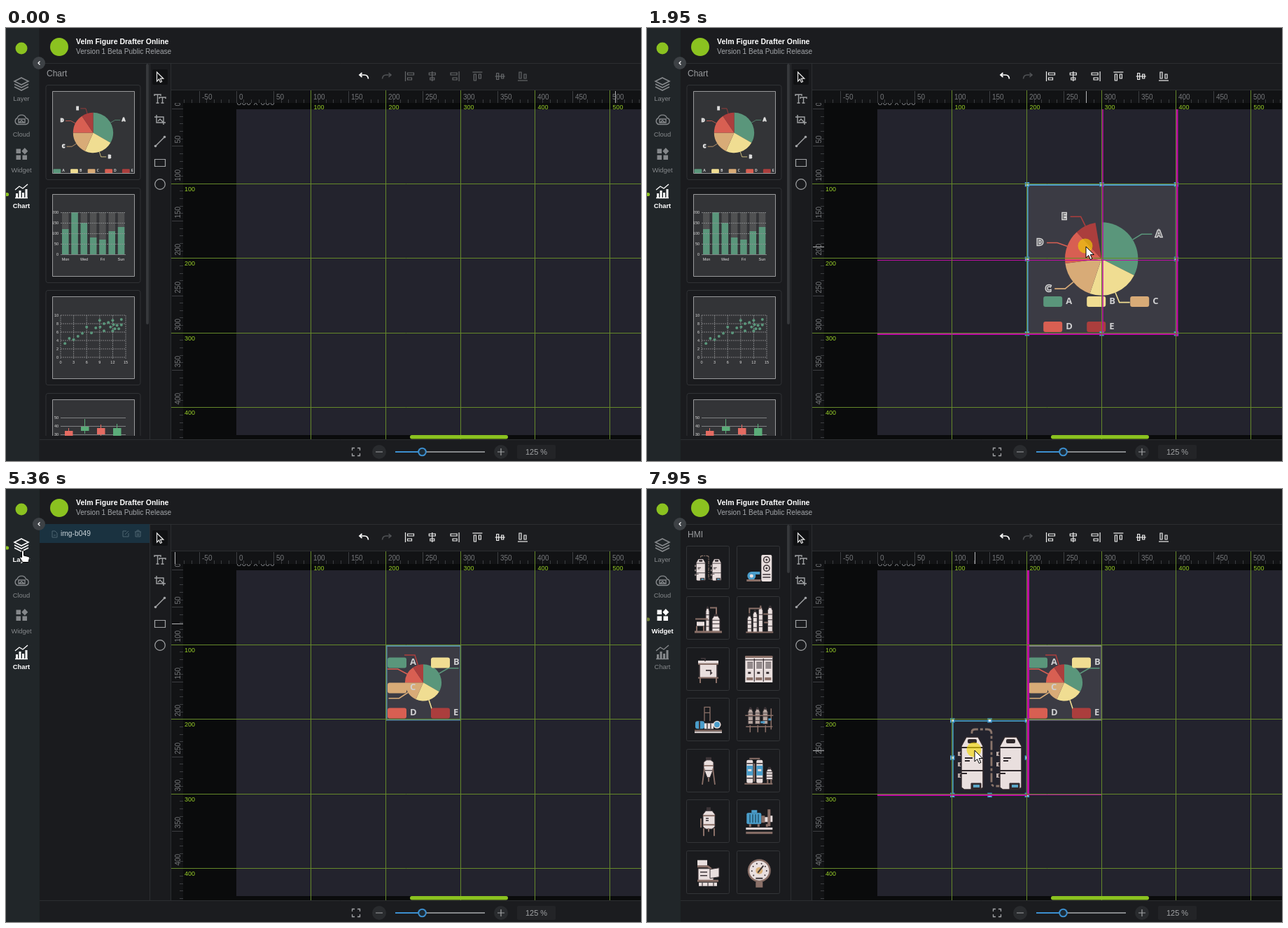
Animation of 907 by 618 pixels, one loop 8000 ms. Source, as an HTML page with a canvas:

```html
<!DOCTYPE html>
<html lang="en">
<head>
<meta charset="utf-8">
<title>Sketch builder</title>
<style>
html, body { margin: 0; width: 100%; height: 100%; overflow: hidden; background: #1a1b1e; }
canvas { display: block; }
</style>
</head>
<body>
<canvas id="stage" width="907" height="618"></canvas>
<script>
const c = document.getElementById('stage').getContext('2d');
const LOOP = 8000, RAD = Math.PI / 180;
const PANEL = '#1a1b1e', LINE = '#2c2e31', GREEN = '#8bc220', PINK = '#bd0ca4', VEIL = 'rgba(255,255,255,.11)';
const LIGHT = '#e9dfde', DARK = '#3d3538', BROWN = '#8a7068', BLUE = '#4a9dca';
const COLORS = ['#46896b', '#eed985', '#d3a066', '#d34b3d', '#a12625'];
const ENDS = [0, 120, 204, 270, 326, 360];

// Cursor path: time, x, y, and 1 for a segment of even speed
const PATH = [
  [70, 84, 168], [220, 113, 139], [900, 611, 314], [1400, 611, 314], [1800, 627, 312], [2080, 627, 312],
  [2580, 765, 449], [2960, 754, 437], [3250, 754, 437], [3310, 702, 386, 1], [3370, 666, 361, 1],
  [3560, 650, 336, 1], [4190, 646, 330], [4430, 646, 330], [5240, 24, 88], [5480, 24, 88], [6100, 22, 180],
  [6200, 22, 180], [6450, 100, 115], [6930, 330, 326, 1], [7300, 480, 390, 1], [7720, 480, 390], [7930, 468, 373]];
const PRESSES = [[200, 950], [1400, 2050], [3200, 4320], [5260, 5330], [6130, 6200], [6450, 7330], [7620, 8000]];

const clamp = (v, lo = 0, hi = 1) => Math.max(lo, Math.min(hi, v));
const smooth = p => (p = clamp(p), p * p * (3 - 2 * p));
const within = (t, a, b) => t >= a && t < b;
const X = u => 329.3 + u * 1.066, Y = u => 115.6 + u * 1.0656;
const snap = v => Math.floor(v) + .5;

function cursorAt(t) {
  const i = PATH.findIndex(k => k[0] > t);
  if (i <= 0) return PATH[i ? PATH.length - 1 : 0].slice(1, 3);
  const [t0, x0, y0] = PATH[i - 1], [t1, x1, y1, even] = PATH[i];
  const p = (t - t0) / (t1 - t0), q = even ? p : smooth(p);
  return [x0 + (x1 - x0) * q, y0 + (y1 - y0) * q];
}

function rect(color, x, y, w, h, r = 0) {
  c.fillStyle = color;
  c.beginPath(); c.roundRect(x, y, w, h, r); c.fill();
}
function frame(color, x, y, w, h, width = 1, r = 0) {
  c.strokeStyle = color; c.lineWidth = width;
  c.beginPath(); c.roundRect(x, y, w, h, r); c.stroke();
}
function disc(color, x, y, r) {
  c.fillStyle = color;
  c.beginPath(); c.arc(x, y, r, 0, 7); c.fill();
}
function path(d, color, width = 1, fill) {
  const p = new Path2D(d);
  if (fill) { c.fillStyle = fill; c.fill(p); }
  if (color) { c.strokeStyle = color; c.lineWidth = width; c.stroke(p); }
}
const line = (x0, y0, x1, y1, color, width) => path(`M${x0} ${y0}L${x1} ${y1}`, color, width);
function text(s, x, y, size, color, align = 'left', weight = '') {
  c.font = `${weight} ${size}px "Liberation Sans", Arial, sans-serif`;
  c.textAlign = align; c.textBaseline = 'middle'; c.fillStyle = color;
  c.fillText(s, x, y);
}
function at(x, y, scale, draw) {
  c.save(); c.translate(x, y); c.scale(scale, scale); draw(); c.restore();
}
function clipped(x, y, w, h, draw) {
  c.save(); c.beginPath(); c.rect(x, y, w, h); c.clip(); draw(); c.restore();
}

function pieChart(x, y, size, progress, small) {
  const cx = x + size / 2, cy = y + size / 2, r = size * .245, k = small ? .5 : 1;
  const wide = size > 170;
  const font = s => `bold ${s}px "Noto Sans", "Open Sans", sans-serif`;
  c.textBaseline = 'middle';
  COLORS.forEach((color, i) => {
    const a = ENDS[i] * progress, b = ENDS[i + 1] * progress, mid = ((a + b) / 2 - 90) * RAD;
    c.fillStyle = color;
    c.beginPath(); c.moveTo(cx, cy); c.arc(cx, cy, r, (a - 90) * RAD, (b - 90) * RAD); c.fill();
    if (progress < .85) return;
    const side = Math.cos(mid) < 0 ? -1 : 1, out = r + 15 * k;
    const ex = cx + Math.cos(mid) * out, ey = cy + Math.sin(mid) * out, end = ex + side * 15 * k;
    path(`M${cx + Math.cos(mid) * r} ${cy + Math.sin(mid) * r}L${ex} ${ey}H${end}`, color, 1.6 * k);
    if (!wide && !small) return;
    const label = i === 3 && within(size, 150, 211) ? '...' : 'ABCDE'[i];
    c.font = font(13 * k); c.textAlign = side < 0 ? 'right' : 'left';
    c.strokeStyle = '#d8d8d8'; c.lineWidth = 2.4 * k; c.fillStyle = small ? '#d8d8d8' : '#66666a';
    c.strokeText(label, end + side * 5 * k, ey); c.fillText(label, end + side * 5 * k, ey);
  });
  COLORS.forEach((color, i) => {
    const col = small ? i : wide ? i % 3 : [0, 1, 0, 0, 1][i];
    const up = small ? 0 : wide ? (i < 3) : [2, 2, 1, 0, 0][i];
    const s = small ? .4 : 1;
    const lx = small ? x + 1.5 + i * 24.6 : cx - (wide ? 83 : 51) + col * 62, ly = y + size - 17 * s - up * 36;
    rect(color, lx, ly, 27 * s, 15 * s, 3 * s);
    c.font = font(13 * s); c.textAlign = 'left'; c.fillStyle = '#c9c9cb';
    c.fillText('ABCDE'[i], lx + 32 * s, ly + 7 * s);
  });
}

const label = (s, x, y, align) => text(s, x, y, 5.5, '#dcdcdc', align);
function gridLine(x0, y0, x1, y1, dash = [2, 1]) {
  c.setLineDash(dash); line(x0, y0, x1, y1, '#85878a', .8); c.setLineDash([]);
}
function barChart() {
  [120, 200, 150, 80, 70, 110, 130].forEach((v, i) => {
    rect('#3a3b3d', 80 + i * 13.3, 263, 9.5, 60);
    rect(COLORS[0], 80 + i * 13.3, 323 - v * .3, 9.5, v * .3);
  });
  for (let v = 0; v <= 200; v += 50) {
    gridLine(78, 323.5 - v * .3, 171, 323.5 - v * .3, v ? [2, 1] : []);
    label(v, 75, 323.5 - v * .3, 'right');
  }
  ['Mon', 'Wed', 'Fri', 'Sun'].forEach((d, i) => label(d, 85 + i * 26.5, 330, 'center'));
}
function scatterChart() {
  for (let i = 0; i < 6; i++) {
    gridLine(78, 470 - i * 12, 171, 470 - i * 12);
    gridLine(78 + i * 18.6, 410, 78 + i * 18.6, 472);
    label(i * 2, 75, 470 - i * 12, 'right');
    label(i * 3, 78 + i * 18.6, 477, 'center');
  }
  [[1, 3.3], [2, 4.5], [3, 4.2], [4, 5], [5, 5.7], [6, 7.2], [7.1, 5.8], [8.1, 7], [9, 8.8], [9.1, 7.2], [10, 8],
   [10, 6.3], [11, 8.3], [11.5, 7.2], [12, 6.3], [12, 8.8], [12.2, 7.8], [12.5, 6.8], [13, 7.6], [13.4, 6.8],
   [14, 9], [14, 7.7]].forEach(([x, y]) => disc(COLORS[0], 78 + x * 6.2, 470 - y * 6, 2));
}
function candleChart() {
  [50, 40, 30].forEach((v, i) => {
    gridLine(78, 556.5 + i * 12, 171, 556.5 + i * 12, []);
    label(v, 75, 556.5 + i * 12, 'right');
  });
  [[575, 9, 571], [569, 6, 558], [571, 9, 566], [571, 12, 565]].forEach(([y, h, wick], i) => {
    const x = 84 + i * 23, color = i % 2 ? '#47a268' : '#e0594f';
    line(x + 5.5, wick, x + 5.5, y + h + 4, color, 1);
    rect(color, x, y, 11.5, h);
  });
}
function thumb(x, y, draw) {
  draw();
  rect(VEIL, x, y, 117, 117);
  frame('#98999b', x, y, 117, 117);
}
function chartPanel() {
  text('Chart', 58, 66, 12, '#9a9c9f');
  [() => pieChart(66, 91, 117, 1, true), barChart, scatterChart, candleChart].forEach((draw, i) => {
    const y = 82 + i * 146.6;
    frame('#303235', 57, Math.round(y) - .5, 135, 135, 1, 3);
    thumb(66.5, Math.round(y + 9) - .5, draw);
  });
  rect('#36383b', 200, 51, 4, 372, 2);
}

function layerPanel() {
  rect('#1a3240', 48, 50, 157, 27);
  path('M66 60h4l3 3v6h-7zM68 66h3', '#4d6470');
  text('img-b049', 78, 64, 10.3, '#c9d3d8');
  path('M172 60h-5v8h8v-5M170 65l5-5M184 61h9M187 61v-2h3v2M185 61v7h7v-7M187.5 63v4M189.5 63v4', '#4d6470');
}

// Machine symbols, drawn in a card of 62 by 62
function tank(x, y, w, h, fill = LIGHT) {
  path(`M${x} ${y + 5}l${w * .3} -5h${w * .4}l${w * .3} 5v${h - 5}h${-w}z`, DARK, 1, fill);
  for (const k of [.3, .52, .78]) line(x, y + h * k, x + w, y + h * k, DARK, 1);
  rect(DARK, x + w * .3, y - 2, w * .4, 3.5);
}
function twinTanks() {
  c.setLineDash([13, 3, 4, 3]);
  path('M28 19V17Q28 13 33 13H50Q56 13 56 19V89Q56 94 61 94H70', '#8a756b', 2.8);
  c.setLineDash([]);
  for (const x of [0, 55]) {
    for (const y of [45, 60, 76]) {
      rect('#b5a8a5', x + 8, y, 5, 6);
      rect('#30292c', x + 11, y + 1, 3, 4);
    }
    path(`M${x + 13} 37l7 -13h17l7 13v59l-4 3h-23l-4 -3z`, '#30292c', 1.5, LIGHT);
    rect('#30292c', x + 22, 27, 13, 6, 2);
    path(`M${x + 13} 39h31M${x + 13} 72h31M${x + 13} 76h8M${x + 18} 54h11M${x + 18} 58h7`, '#30292c', 2);
    path(`M${x + 27} 99v-9h14v9z`, '#30292c', 1, '#30292c');
    rect('#5ba6c6', x + 30, 92, 9, 4);
  }
}
const SYMBOLS = [
  () => at(8, 8, .413, twinTanks),
  () => { rect(LIGHT, 34, 12, 15, 38, 2); [19, 31].forEach(y => { disc(DARK, 41.5, y, 5); disc(LIGHT, 41.5, y, 3.5); disc(DARK, 41.5, y, 1.5); });
    path('M36 40h11M36 44h11', DARK, 1.3); disc(BLUE, 20, 42, 6); disc(LIGHT, 20, 42, 2.5); rect(BLUE, 20, 36, 12, 4); rect(BROWN, 13, 47, 20, 3); },
  () => { tank(27, 15, 5, 34); tank(36, 26, 11, 23); rect(LIGHT, 14, 35, 11, 6); path('M12 31h18M14 41v9M24 41v9M42 24v-9h-9', BROWN, 2); rect(BROWN, 11, 48, 39, 3); },
  () => { [14, 22, 30].forEach((x, i) => tank(x, 26 - i * 6, 6, 24 + i * 6)); tank(43, 14, 7, 35); path('M17 23v-7h16v-4M37 24h7M38 36h6', BROWN, 2); rect(BROWN, 12, 49, 39, 2); },
  () => { rect(LIGHT, 16, 18, 29, 4); rect(BROWN, 16, 22, 29, 2); rect(LIGHT, 18, 24, 25, 18); path('M20 15h6v4M27 32h7v5l2-2M18 24v18M43 24v18', DARK, 1.6);
    path('M19 42v8M42 42v8M16 42.5h29', BROWN, 2); },
  () => { rect(LIGHT, 11, 12, 39, 37); rect(BROWN, 11, 11, 39, 3); path('M24 15v33M37 15v33M11 17h39', DARK, 1.2);
    [13, 26, 39].forEach(x => { for (let y = 20; y < 30; y += 2) rect(DARK, x + 1, y, 8, 1); rect(DARK, x + 2, 34, 4, 3); rect(BROWN, x, 42, 9, 4); }); },
  () => { path('M25 32V12h8v20M25 20h8', BROWN, 1.3); rect(BLUE, 12, 32, 13, 11, 3); rect(DARK, 17, 32, 2, 11); rect(LIGHT, 25, 35, 13, 8);
    path('M29 35v8M34 35v8', DARK, 1.4); disc(LIGHT, 43, 37, 5.5); disc(BLUE, 43, 37, 4); path('M11 45.5h39', BROWN, 2); path('M11 48h39', LIGHT, 2); },
  () => { [15, 25, 36].forEach(x => tank(x, 14, 7, 22, '#b8a8a2')); path('M11 24h40M12 40h38M18 38v10M29 38v10M40 38v10M48 14v30', BROWN, 1.5); rect(BLUE, 33, 32, 6, 3); rect(BLUE, 44, 28, 4, 3); },
  () => { rect(DARK, 27, 11, 8, 4); path('M24 18l4-3h6l4 3v12h-14z', DARK, 1, LIGHT); path('M25 30h12l-4 10h-4z', DARK, 1, LIGHT); path('M25 27l-3 23M37 27l3 23M31 40v6M24 23h14', BROWN, 1.8); },
  () => { [13, 27].forEach(x => { rect(LIGHT, x, 15, 9, 33, 2); rect(BLUE, x, 23, 9, 14); rect(LIGHT, x + 2, 28, 5, 3); path(`M${x} 20h9M${x} 41h9`, DARK, 1.4); });
    tank(41, 27, 9, 16); path('M17 13h15M24 20v26M43 43v6M48 43v6M10 49h40', BROWN, 2); },
  () => { rect(DARK, 28, 10, 6, 5); path('M23 20l4-5h9l4 5v18l-4 3h-9l-4-3z', DARK, 1, LIGHT); path('M23 22h17M23 35h17M24 40v11M39 40v11M20 26v13M31 40v5', BROWN, 2); path('M27 26h4M27 29h4', DARK, 1.5); },
  () => { rect(BLUE, 13, 18, 21, 16, 2); for (let x = 17; x < 33; x += 4) rect('#25546c', x, 20, 1.5, 12); rect(BLUE, 20, 14, 8, 4); rect(BROWN, 34, 22, 5, 10);
    rect(LIGHT, 39, 24, 5, 7); rect(BROWN, 43, 13, 4, 24); rect(LIGHT, 47, 22, 3, 9); path('M18 34v4M30 34v4M42 34v4', BROWN, 3); rect(LIGHT, 12, 39, 38, 3); rect(BROWN, 12, 45, 38, 3); },
  () => { rect(LIGHT, 15, 13, 14, 8); path('M15 22h15l5 4', BROWN, 3); path('M16 25h16l6 4v13h-22z', DARK, 1, LIGHT); path('M33 26l13-2v13l-13 2z', DARK, 1, LIGHT);
    path('M19 30h10M19 35h10', DARK, 1.6); rect(BROWN, 15, 41, 30, 3); rect(LIGHT, 17, 45, 26, 5); path('M22 45v5M30 45v5M38 45v5', DARK, 1.2); },
  () => { rect(BROWN, 26, 44, 10, 8); disc(BROWN, 31, 28, 16.5); disc(LIGHT, 31, 28, 14); for (let a = 140; a <= 400; a += 37)
    disc(DARK, 31 + Math.cos(a * RAD) * 10.5, 28 + Math.sin(a * RAD) * 10.5, 1); disc('#d9b27c', 31, 28, 5); line(29, 31, 37, 21, DARK, 2); rect(DARK, 26, 38, 10, 2); },
];
function widgetPanel() {
  text('HMI', 58, 66, 12, '#9a9c9f');
  SYMBOLS.forEach((draw, i) => {
    const x = 57 + i % 2 * 72.3, y = 82 + (i >> 1) * 72.45;
    frame('#333538', Math.round(x) - .5, Math.round(y) - .5, 61, 61, 1, 2);
    at(x, y, 1, draw);
  });
  rect('#36383b', 200, 51, 4, 69, 2);
}

function border(x, y, w, color, handles) {
  frame(color, x + 1, y + 1, w - 1, w - 1, 1.8);
  if (!handles) return;
  for (const i of [0, .5, 1]) for (const j of [0, .5, 1]) {
    if (i === .5 && j === .5) continue;
    rect('#3f93c9', x + i * w - 3, y + j * w - 3, 6.5, 6.5);
    rect('#dceaf2', x + i * w - 1.5, y + j * w - 1.5, 3.5, 3.5);
  }
}
const guideX = (x, bottom, width = 2) => line(x, 116, x, bottom, PINK, width);
const guideY = (y, right, width = 2) => line(329, y, right, y, PINK, width);

function workspace(t) {
  rect('#0a0b0c', 236, 89, 671, 498);
  rect('#23232d', 329, 116, 578, 465);
  text('800 x 600', 329.5, 107, 12.4, '#77797d');
  if (t >= 960) {
    const q = smooth((t - 1420) / 380), x = 527 + 15.7 * q, y = 230 - 7 * q;
    const sizeAt = lag => t < 3250 ? 213 : t > 4300 ? 106.6 : clamp(cursorAt(t - lag)[0] - 541, 106.6, 213);
    const w = sizeAt(60), size = sizeAt(112);
    clipped(x, y, size, size, () => pieChart(x, y, size, 1 - (1 - clamp((t - 1250) / 1000)) ** 3));
    rect(VEIL, x, y, w, w);
    const color = t < 1400 || t > 7620 ? '#7d7d81' : t < 5300 ? '#4b9bcb' : '#568ba0';
    border(x, y, w, color, within(t, 1400, 5300));
    if (within(t, 1780, 2050)) {
      guideX(757, 440, 3); guideX(651, 437, 1.5);
      guideY(331.5, 757, 1); guideY(437, 757);
    }
    if (within(t, 3290, 4320)) { guideX(544, y + size); guideY(224, x + size); }
  }
  if (t >= 7350) {
    const q = smooth((t - 7760) / 160), x = 446 - 10 * q, y = 341 - 11 * q;
    at(x, y, 1, twinTanks);
    border(x, y, 106.6, t < 7620 ? '#7d7d81' : '#428fb0', t >= 7620);
    if (t > 7860) { guideX(544.5, 437, 3); guideY(437, 543); guideY(436.5, 649, 1); }
  }
}

function rulers(t) {
  rect('#121315', 236, 89, 671, 18);
  rect('#121315', 236, 107, 17, 480);
  clipped(253, 89, 654, 18, () => {
    for (let u = -80; u < 550; u += 10) {
      const major = u % 50 === 0, x = snap(X(u));
      line(x, major ? 90 : 102, x, 107, '#3c3e41', 1);
      if (major) text(u, x + 3.5, 99.5, 10, '#75777a');
    }
  });
  clipped(236, 107, 17, 480, () => {
    for (let u = 0; u < 450; u += 10) {
      const major = u % 50 === 0, y = snap(Y(u));
      line(major ? 237 : 248, y, 253, y, '#3c3e41', 1);
      if (major) { c.save(); c.translate(246, y - 4); c.rotate(-90 * RAD); text(u, 0, 0, 10, '#75777a'); c.restore(); }
    }
  });
  for (let u = 100; u <= 500; u += 100) {
    const x = snap(X(u)), y = snap(Y(u));
    line(x, 89, x, 587, '#65882a', 1);
    text(u, x + 4, 114, 9, '#98cf28');
    if (u === 500) continue;
    line(236, y, 907, y, '#65882a', 1);
    text(u, 255, y + 8, 9, '#98cf28');
  }
  let mark = cursorAt(t - 40);
  if (t < 960) mark = [870, 587];
  else if (within(t, 4600, 7350) && (t > 5200 || mark[0] < 241)) mark = [241, 192];
  line(snap(mark[0]), 90, snap(mark[0]), 107, '#b5b6b8', 1);
  line(237, snap(mark[1]), 253, snap(mark[1]), '#b5b6b8', 1);
}

function alignIcon(i, color) {
  c.save();
  c.translate(576.5 + i * 32.3, 69);
  if (i > 2) c.transform(0, 1, 1, 0, 0, 0);
  const m = i % 3 - 1, left = w => m < 0 ? -3 : m ? 3 - w : -w / 2;
  line(m * 6, -7, m * 6, 7, color, 1.2);
  frame(color, left(9), -5, 9, 3, 1.2);
  frame(color, left(6), 2, 6, 3, 1.2);
  c.restore();
}

function sidebar(t) {
  rect('#212629', 0, 0, 47.5, 618);
  disc(GREEN, 22, 29, 8.5);
  const tint = on => on ? '#fff' : '#85888b';
  const layer = tint(within(t, 5160, 6160)), widget = tint(t >= 6000), chart = tint(t < 5420);
  path('M22 71l10 5-10 5-10-5zM12 80l10 5 10-5M12 84l10 5 10-5', layer, 1.6);
  path('M16 137.5a5 5 0 0 1 0-9a6.5 6 0 0 1 12.5 0a4.6 4.6 0 0 1 0 9zM18 130h9v5h-9zM19 135l3-3 4 3', '#85888b', 1.4);
  path('M14.5 172.5h6.5v6.5h-6.5zM14.5 181.5h6.5v6.5h-6.5zM23.5 181.5h6.5v6.5h-6.5zM26.8 171l4.5 4.7-4.5 4.7-4.5-4.7z', null, 1, widget);
  path('M15.5 236v6M20 232v10M24.5 235v7M29 230v12', chart, 3);
  path('M13 242.5h18M13 231l6-5 5 3 7-6', chart, 1.4);
  [['Layer', 101, layer], ['Cloud', 152, '#85888b'], ['Widget', 203, widget], ['Chart', 254, chart]].forEach(([s, y, color]) =>
    text(s, 22, y, 9.4, color, 'center', color === '#fff' ? 'bold' : ''));
  disc(t < 6160 ? GREEN : '#6f8137', 1.5, t < 5270 ? 237.5 : t < 6160 ? 84 : 186, 2.6);
}

function chrome(t) {
  rect('#1b1c1f', 48, 0, 859, 50);
  rect(PANEL, 48, 50, 188, 537);
  rect('#1b1c1f', 236, 51, 671, 38);
  rect('#1b1c1f', 48, 587, 859, 31);
  clipped(48, 50, 157, 532, t < 5300 ? chartPanel : t < 6170 ? layerPanel : widgetPanel);
  line(48, 50.5, 907, 50.5, LINE, 1);
  if (within(t, 5300, 6170)) rect('#1a3240', 48, 50, 157, 2);
  line(48, 587.5, 907, 587.5, LINE, 1);
  line(205.5, 50, 205.5, 587, LINE, 1);
  line(235.5, 50, 235.5, 587, LINE, 1);
  line(236, 88.5, 907, 88.5, LINE, 1);

  disc(GREEN, 76, 27, 13);
  text('Velm Figure Drafter Online', 100, 20, 10.5, '#fff', 'left', 'bold');
  text('Version 1 Beta Public Release', 100, 34.5, 10.15, '#a3a6aa');

  rect('#101113', 209, 59, 22, 22, 2);
  path('M215.5 63v13l3-3 2 4.5 2-1-2-4.3h4.3z', '#e6e6e6', 1.2);
  path('M212 97v-2h9v2M216.5 95v12M214.5 107h4M219 101v-2h9v2M223.5 99v8M221.5 107h4', '#a2a4a6', 1.4);
  path('M215 124v11h13M212 127h13v11M217 133l3-3 4 4', '#a2a4a6', 1.4);
  path('M214 168L226 156', '#a2a4a6', 1.4);
  disc('#a2a4a6', 213.5, 168.5, 1.8); disc('#a2a4a6', 226.5, 155.5, 1.8);
  frame('#a2a4a6', 212.5, 187.5, 15, 10, 1.2);
  c.beginPath(); c.arc(220, 223, 7.3, 0, 7); c.stroke();

  path('M506 67h6q5 0 5.5 5.5M508.5 64l-3.5 3 3.5 3', '#fff', 1.7);
  path('M549 67h-6q-5 0-5.5 5.5M546.5 64l3.5 3-3.5 3', '#505255', 1.6);
  for (let i = 0; i < 6; i++) alignIcon(i, t < 1400 ? '#66686b' : '#f0f0f0');

  rect(GREEN, 577, 581, 140, 5.5, 2.7);
  path('M494.5 603v-3.5h3.5M502 599.5h3.5v3.5M505.5 607v3.5h-3.5M498 610.5h-3.5v-3.5', '#a2a4a6', 1.3);
  disc('#292b2e', 533, 605, 10);
  disc('#292b2e', 707, 605, 10);
  path('M528 605h10M702 605h10M707 600v10', '#a2a4a6', 1.2);
  line(556, 605, 590, 605, '#3c8fcf', 2);
  line(594, 605, 684, 605, '#85878a', 2);
  disc('#3c8fcf', 594.5, 605, 6.3);
  disc('#1d2a35', 594.5, 605, 4.3);
  rect('#232427', 730, 595, 55, 20, 2);
  text('125 %', 757.5, 605.5, 11, '#a2a4a6', 'center');

  sidebar(t);
  disc('#3d4145', 47, 50, 9);
  path('M48.5 47.5l-2.5 2.5 2.5 2.5', '#fff', 1.2);
}

function ghost(t) {
  c.globalAlpha = .5;
  if (within(t, 230, 960)) {
    const [x, y] = cursorAt(t - 70);
    at(x - 113, y - 139, 1, () => thumb(66.5, 91.5, () => pieChart(66, 91, 117, 1, true)));
  }
  if (within(t, 6500, 7350)) {
    const [x, y] = cursorAt(t - 85);
    at(x - 36, y - 26, .413, twinTanks);
  }
  c.globalAlpha = 1;
}

function cursor(t) {
  if (t < 70) return;
  const [x, y] = cursorAt(t);
  if (PRESSES.some(([a, b]) => within(t, a, b))) disc('rgba(242,217,0,.62)', x - 1, y - 1, 10.5);
  at(x, y, 1, () => {
    if (x < 44 && within(t, 5000, 6400)) {
      path('M-1.5 1a1.5 1.5 0 0 1 3 0v6l6.5 1.5q1.5 .5 1.5 2l-1.5 6h-8l-4.5-6.5q0-2 3-.5z', '#000', 1, '#fff');
      return;
    }
    path('M0 0v16l3.7-3.5 2.6 6 2.6-1.1-2.6-5.9h5z', '#000', 1, '#fff');
    if (within(t, 260, 950) || within(t, 6500, 7330)) {
      c.setLineDash([1, 1]); frame('#ddd', 1.5, 12.5, 9, 7); c.setLineDash([]);
      rect('#fff', 8, 16, 9, 9);
      frame('#222', 8.5, 16.5, 8, 8);
      path('M10.5 20.5h4M12.5 18.5v4', '#000', 1);
    }
  });
}

function draw(now) {
  const t = now % LOOP;
  workspace(t);
  rulers(t);
  chrome(t);
  ghost(t);
  cursor(t);
  requestAnimationFrame(draw);
}
requestAnimationFrame(draw);
</script>
</body>
</html>
```
